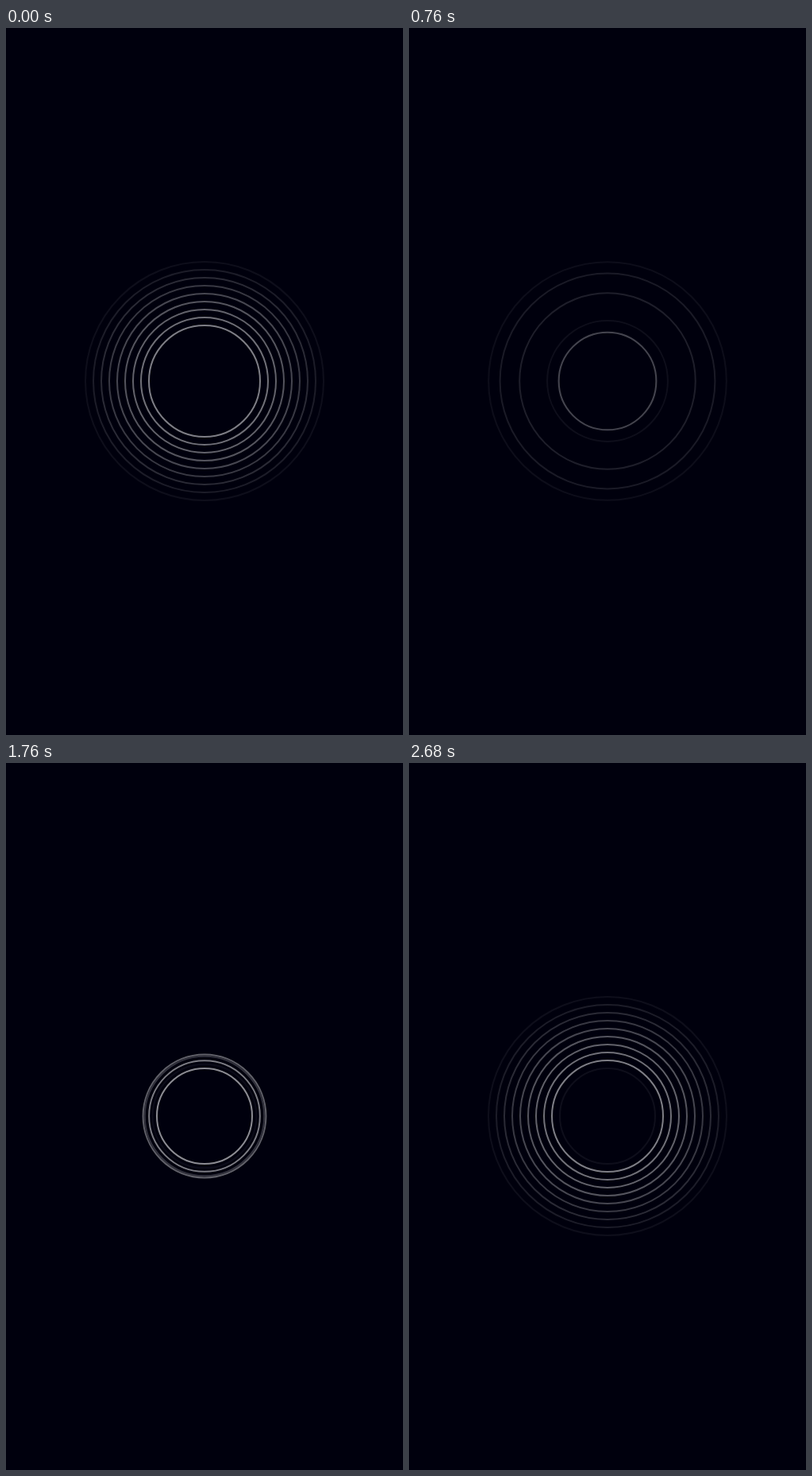
These frames come from a looping animation (500x889 px, 2.76 s). An HTML page without scripts:

```html
<!DOCTYPE html>
<html lang="en">
<head>
<meta charset="utf-8">
<title>Breathing rings</title>
<style>
  html, body { margin: 0; width: 100%; height: 100%; overflow: hidden; background: #00000d; }
  svg { display: block; width: 100%; height: 100%; }
  circle { fill: none; stroke: #fff; stroke-width: 2px; }

  /* Each ring folds into the core and unfolds again, 80 ms after its inner neighbour. */
  .ring {
    --r: calc(70px + var(--k) * 10px);
    --o: calc(.055 * (9 - var(--k)));
    r: var(--r);
    opacity: var(--o);
    animation: fold 2760ms cubic-bezier(.65, 0, .35, 1) calc(var(--k) * 80ms) infinite;
  }
  @keyframes fold {
    0%, 3.623% { r: var(--r); opacity: var(--o); }
    19.565%, 50% { r: 60px; opacity: 0; }
    65.942%, 100% { r: var(--r); opacity: var(--o); }
  }

  .core {
    r: 60px;
    opacity: 0;
    animation: swell 2760ms cubic-bezier(.37, 0, .63, 1) infinite, glow 2760ms linear infinite;
  }
  @keyframes swell {
    0%, 4.348% { r: 36.5px; }
    39.13%, 43.478% { r: 69.5px; }
    63.768%, 100% { r: 60px; }
  }
  @keyframes glow {
    0%, 4.348% { opacity: 0; }
    39.13%, 43.478% { opacity: .4; }
    56.522% { opacity: .5; }
    63.768%, 68.116% { opacity: .55; }
    100% { opacity: .01; }
  }
</style>
</head>
<body>
<svg viewBox="0 0 500 889">
  <g transform="translate(250 444)">
    <circle class="core"/>
    <circle class="ring" style="--k:0"/>
    <circle class="ring" style="--k:1"/>
    <circle class="ring" style="--k:2"/>
    <circle class="ring" style="--k:3"/>
    <circle class="ring" style="--k:4"/>
    <circle class="ring" style="--k:5"/>
    <circle class="ring" style="--k:6"/>
    <circle class="ring" style="--k:7"/>
    <circle class="ring" style="--k:8"/>
  </g>
</svg>
</body>
</html>
```
